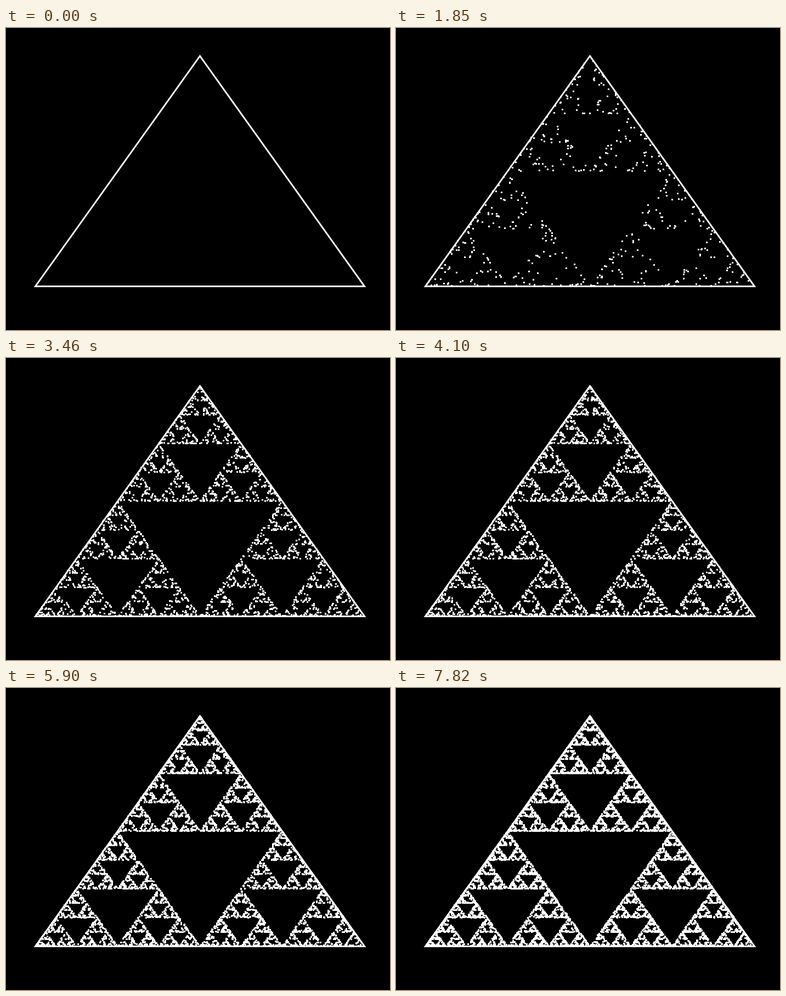
Write an HTML page with a canvas that moves like this. It is 700x550 px and loops after 7900 ms.

```html
<!DOCTYPE html>
<html>
<head>
<meta charset="utf-8">
<title>Chaos game</title>
<style>
html, body { margin: 0; width: 100%; height: 100%; overflow: hidden; background: #000; }
canvas { display: block; }
</style>
</head>
<body>
<canvas width="700" height="550"></canvas>
<script>
const LOOP = 7900, START = 920, LAST = 7820, STEPS = 90;
const RATE = 110, RAMP = 16, DOT = 3;
const ctx = document.querySelector('canvas').getContext('2d');
const corners = [[53.5, 470.5], [353.5, 51], [653.5, 470.5]];

function random(seed) {
  return () => {
    seed = seed + 0x6D2B79F5 | 0;
    let r = Math.imul(seed ^ seed >>> 15, 1 | seed);
    r = r + Math.imul(r ^ r >>> 7, 61 | r) ^ r;
    return ((r ^ r >>> 14) >>> 0) / 4294967296;
  };
}

// Each point lies halfway between the previous one and a random corner
function chaosGame(count) {
  const rand = random(29), points = [];
  let x = 353.5, y = 330;
  for (let i = -10; i < count; i++) {
    const [cx, cy] = corners[Math.floor(rand() * 3)];
    x = (x + cx) / 2;
    y = (y + cy) / 2;
    if (i >= 0) points.push([Math.floor(x) - 1, Math.floor(y) - 1]);
  }
  return points;
}

function stepAt(time) {
  if (time < START) return 0;
  const gap = (LAST - START) / (STEPS - 1);
  return Math.min(STEPS, 1 + Math.floor((time - START + 5) / gap));
}

// The rate of new points grows over the first steps, then stays constant
function pointCount(step) {
  return Math.round(RATE * (step < RAMP ? step * step / (2 * RAMP) : step - RAMP / 2));
}

const points = chaosGame(pointCount(STEPS));

function draw(step) {
  ctx.fillStyle = '#000';
  ctx.fillRect(0, 0, 700, 550);
  ctx.fillStyle = ctx.strokeStyle = '#fff';
  ctx.lineWidth = 3;
  ctx.beginPath();
  for (const [x, y] of corners) ctx.lineTo(x, y);
  ctx.closePath();
  ctx.stroke();
  for (const [x, y] of points.slice(0, pointCount(step))) ctx.fillRect(x, y, DOT, DOT);
}

const began = performance.now();
let shown = -1;
function frame() {
  const step = stepAt((performance.now() - began) % LOOP);
  if (step !== shown) draw(shown = step);
  requestAnimationFrame(frame);
}
frame();
</script>
</body>
</html>
```
